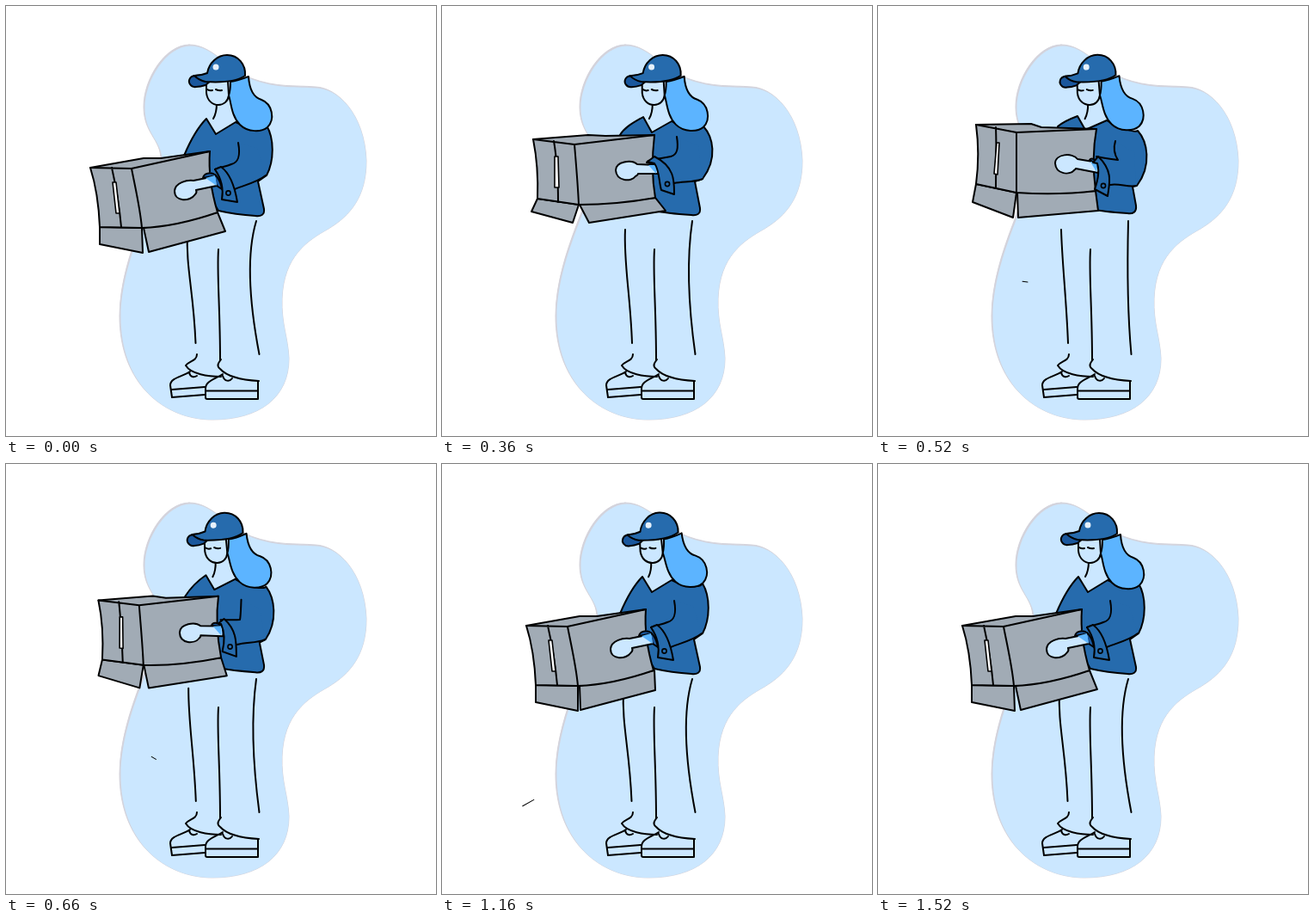
Write an HTML page with a canvas that moves like this. It is 500 by 500 pixels and loops after 1.54 s.

```html
<!DOCTYPE html>
<html lang="en">
<head>
<meta charset="utf-8">
<title>Parcel carrier</title>
<style>
  html, body { margin: 0; width: 100%; height: 100%; overflow: hidden; background: #fff; }
  canvas { display: block; width: 500px; height: 500px; }
</style>
</head>
<body>
<canvas id="stage" width="500" height="500"></canvas>
<script>
const ctx = document.getElementById('stage').getContext('2d');
const LOOP = 1540;
const TIMES = [0, 220, 360, 520, 840, 1160, LOOP];
const PALE = '#cbe7ff', NAVY = '#266bad', DEEP = '#1a579c', SKY = '#5cb4ff';
const GREY = '#a1abb5', RIM = '#d3d3dc', INK = '#000';

// Four arm poses: lowered, lifted, settling, lifted high. Lowered is held to the end.
const poses = (low, lift, settle, high) => [low, lift, settle, high, low, low, low];

const torso = poses(
  'M233 131 L244 149 L267 135 C285 144 300 144 303 139 C312 154 312 180 303 197 L293 204 L300 236 C301 243 296 245 290 244 C275 243 260 241 247 238 L207 174 C215 155 222 142 233 131Z',
  'M234 131 L244 148 L267 135 C285 144 302 145 304 140 C315 153 321 180 305 204 L294 206 L300 236 C301 243 296 245 290 244 C275 243 260 241 247 238 L219 148 C223 140 228 137 234 131Z',
  'M234 129 L244 147 L267 134 C285 144 302 145 304 140 C315 152 321 177 303 201 L294 204 L300 235 C301 242 296 244 290 243 C275 242 260 241 247 238 L207 150 C212 141 222 136 234 129Z',
  'M232 128 L241 144 L266 133 C283 144 300 147 302 145 C313 157 319 185 301 209 L296 210 L300 232 C301 240 296 242 290 241 C275 240 260 239 247 236 L209 140 C215 135 224 131 232 128Z');

const boxBody = poses(
  'M98 188 L160 177 L180 177 L237 169 C235 195 240 220 246 240 C220 249 190 257 158 258 L109 257 C108 232 105 210 98 188Z',
  'M107 152 L172 147 L190 149 L248 149 C245 175 245 200 249 221 C220 226 190 229 159 229 L113 220 C114 195 112 172 107 152Z',
  'M106 155 L170 150 L190 151 L247 150 C244 176 244 200 248 223 C220 228 190 231 159 231 L111 224 C112 198 110 175 106 155Z',
  'M114 138 L178 137 L190 141 L254 143 C250 165 250 192 253 215 C220 219 190 219 161 217 L114 207 C117 184 117 160 114 138Z');

const boxSeams = poses(
  'M98 188 L146 189 L237 169 M146 189 C150 210 156 235 158 258 M123 188 C128 210 132 235 134 257',
  'M107 152 L155 158 L248 149 M155 158 C158 180 159 206 159 229 M130 154 C134 178 135 200 135 224',
  'M106 155 L154 161 L247 150 M154 161 C156 185 158 208 159 231 M130 157 C134 180 135 205 135 228',
  'M114 138 L161 147 L254 143 M161 147 C161 170 161 195 161 217 M137 141 C138 165 137 190 137 212');

const slot = poses(
  'M124 205 L128 205 L132 241 L128 241Z',
  'M132 171 L136 171 L136 208 L132 208Z',
  'M131 175 L135 175 L136 211 L131 211Z',
  'M138 159 L141 159 L139 196 L135 195Z');

const sleeve = poses(
  'M270 159 C273 175 270 182 262 184 C252 188 243 189 236 194 L246 205 L266 213 C278 208 292 205 302 197 L292 165Z',
  'M273 155 C273 162 273 168 273 175 C262 176 252 176 244 178 L252 190 L270 206 C282 206 296 207 305 204 L298 165Z',
  'M273 152 C275 165 274 173 266 175 C258 177 250 177 242 180 L252 190 L270 206 C282 204 294 205 303 201 L298 162Z',
  'M276 157 C273 167 275 173 279 179 C270 178 262 177 254 175 L258 192 L270 208 C280 206 291 211 300 209 L298 170Z');

const creases = poses(
  'M270 159 C273 175 270 182 262 184 C256 187 250 187 243 190 M266 213 C278 208 292 205 302 197',
  'M273 155 C273 162 273 168 273 175 C262 176 252 176 244 178 M270 206 C282 206 296 207 305 204',
  'M273 152 C275 165 274 173 266 175 C258 177 250 177 242 180 M270 206 C282 204 294 205 303 201',
  'M276 157 C273 167 275 173 279 179 C270 178 262 177 254 175 M270 208 C280 206 291 211 300 209');

const cuff = poses(
  'M243 190 L250 187 C261 195 266 210 269 228 L251 225 C253 213 250 200 243 190Z',
  'M240 180 L248 176 L265 180 C271 188 269 206 269 221 L254 215 C252 205 254 191 248 183Z',
  'M239 181 L247 175 L264 179 C271 187 270 204 270 219 L255 214 C252 204 253 191 247 183Z',
  'M250 182 L256 175 L269 182 C274 192 269 207 267 221 L252 213 C255 204 258 194 255 183Z'
).map(path => path.replace('L265 180 ', '').replace('L264 179 ', '').replace('L269 182 ', ''));

const cuffOpening = poses(
  'M229 200 C230 194 238 193 243 196 C247 200 250 205 251 213 L245 209 L240 198Z',
  'M238 182 C240 178 246 179 249 183 C252 186 253 190 252 196 L250 194 L246 184Z',
  'M238 182 C240 178 246 179 249 183 C252 186 253 190 252 196 L250 194 L246 184Z',
  'M246 179 C248 176 252 178 254 182 C256 185 257 188 256 193 L255 192 L252 183Z');

const hand = poses(
  'M243 198 L218 203 C211 202 197 205 196 215 C196 228 214 228 220 219 C222 217 222 216 221 214 L245 209',
  'M249 185 L227 183 C220 178 202 181 202 191 C203 204 220 205 225 198 C227 197 228 196 228 194 L251 195',
  'M249 185 L227 184 C220 178 202 181 202 191 C203 204 220 205 225 198 C227 197 228 196 228 195 L251 195',
  'M256 182 L232 178 C226 170 206 172 206 183 C207 196 223 197 228 191 C229 190 230 190 230 189 L256 194');

const wristShade = poses(
  'M232 200 L243 197 L245 209Z', 'M240 185 L251 185 L249 195Z',
  'M240 185 L251 185 L249 195Z', 'M247 181 L256 182 L254 193Z');

const button = poses('M258.5 217.5', 'M261 208', 'M262 207', 'M262 209');

const thigh = poses(
  'M211 262 C209 305 218 330 220.5 392', 'M213 260 C208 295 219 335 221 392',
  'M213 260 C211 298 219 335 221 392', 'M213 260 C214 298 219 340 221 392');

const backLeg = poses(
  'M291 250 C279 290 283 345 294.5 405', 'M291 250 C280 290 284 345 294.5 405',
  'M291 250 C285 290 286 345 294.5 405', 'M291 250 C290 290 289 345 294.5 405');

const leftFlap = [
  'M109 257 L109 277 L159 287 L158 258Z',
  'M113 220 L109 241 L157 257 L159 229Z',
  'M111 224 L104 239 L152 252 L159 231Z',
  'M114 207 L110 228 L157 246 L161 217Z',
  'M109 257 L104 272 L153 281 L158 258Z',
  'M109 257 L109 277 L158 287 L158 258Z',
  'M109 257 L109 277 L159 287 L158 258Z'];

const rightFlap = [
  'M160 258 L166 286 L255 262 L246 240Z',
  'M161 229 L165 257 L257 242 L249 221Z',
  'M160 231 L171 252 L260 238 L248 223Z',
  'M162 217 L163 246 L256 238 L253 215Z',
  'M158 258 L170 281 L258 258 L246 240Z',
  'M160 258 L161 286 L248 263 L247 240Z',
  'M160 258 L166 286 L255 262 L246 240Z'];

const headTilt = [0, 0, -0.3, -1.3, -3.1, -2.8, 0].map(String);

function segment(t) {
  let i = 0;
  while (i < TIMES.length - 2 && t >= TIMES[i + 1]) i++;
  const u = (t - TIMES[i]) / (TIMES[i + 1] - TIMES[i]);
  return [i, u * u * (3 - 2 * u)];
}

const NUMBER = /-?\d+(\.\d+)?/g;

// Blends the numbers of two neighbouring keys that share one structure.
function blend(keys, t) {
  const [i, u] = segment(t);
  const next = keys[i + 1].match(NUMBER);
  let n = 0;
  return keys[i].replace(NUMBER, v => (+v + (next[n++] - v) * u).toFixed(3));
}

function paint(path, fill, stroke = INK, width = 2) {
  const shape = new Path2D(path);
  if (fill) { ctx.fillStyle = fill; ctx.fill(shape); }
  if (stroke) { ctx.strokeStyle = stroke; ctx.lineWidth = width; ctx.stroke(shape); }
}

function disc(x, y, r, fill, stroke) {
  ctx.beginPath();
  ctx.arc(x, y, r, 0, Math.PI * 2);
  if (fill) { ctx.fillStyle = fill; ctx.fill(); }
  if (stroke) { ctx.strokeStyle = stroke; ctx.lineWidth = 1.6; ctx.stroke(); }
}

const blob = 'M213 45 C185 45 160 85 160 117 C160 148 180 155 180 178 C180 215 133 285 132 360 ' +
  'C132 440 185 481 240 481 C295 481 329 455 329 410 C328 385 320 370 321 340 ' +
  'C323 291 350 273 375 259 C400 244 419 222 419 180 C417 125 385 95 360 94 ' +
  'C335 92 315 95 285 84 C255 72 240 45 213 45Z';

function drawBackdrop() {
  ctx.save();
  paint(blob, RIM, RIM, 1);
  ctx.clip(new Path2D(blob));
  ctx.translate(1.5, 1.5);
  paint(blob, PALE, null);
  ctx.restore();
}

function drawLegs(t) {
  paint(blend(thigh, t));
  paint(blend(backLeg, t));
  paint('M247 283 C245 310 249 350 249 412');
  paint('M222 405 C222 413 212 413 209 418 C215 428 235 431 250 431');
  paint('M214 425 C206 431 191 432 191 441 L193 455 L231 452 M193 446 L231 443 M213 426 C214 432 219 432 222 430');
  paint('M250 411 C246 416 245 419 249 422 C258 432 275 435 294 436');
  paint('M252 428 C243 434 232 436 232 445 L232 455 Q232 457 234 457 L293 457 L293 436 M232 447.5 L293 447.5 M252 430 C254 437 260 437 263 433');
}

function drawHead(t) {
  ctx.save();
  ctx.translate(247, 150);
  ctx.rotate(blend(headTilt, t) * Math.PI / 180);
  ctx.translate(-247, -150);
  paint('M245 113 C245 121 244 126 241 131');
  paint('M233 89 L233 101 C234 110 240 115 247 115 C253 115 258 111 259 104 L258 87', PALE);
  paint('M234 97 Q237 99 240 98 M244 97 Q248 99 251 98');
  paint('M261 88 C270 87 277 84 282 82 C283 97 287 106 297 109 C310 114 313 132 304 141 ' +
    'C297 147 281 147 272 138 C262 128 262 113 259 104 C261 98 261 93 261 88Z', SKY);
  paint('M232 80 C224 82 217 79 214 84 C211 89 215 95 221 94 C225 94 229 93 232 92 L238 87Z', DEEP);
  paint('M234 78 C229 80 224 81 219 81 C223 85 227 87 232 88 ' +
    'C248 89 268 88 278 81 C279 68 270 57 257 57 C246 57 236 66 234 78Z', NAVY);
  disc(244, 71, 3.5, '#e6f1fb');
  ctx.restore();
}

function drawBox(t) {
  paint(blend(leftFlap, t), GREY);
  paint(blend(rightFlap, t), GREY);
  paint(blend(boxBody, t), GREY);
  paint(blend(boxSeams, t));
  paint(blend(slot, t), '#fff', INK, 1.6);
}

function drawArm(t) {
  paint(blend(sleeve, t), NAVY, null);
  paint(blend(creases, t));
  paint(blend(cuffOpening, t), DEEP);
  paint(blend(hand, t), PALE);
  paint(blend(wristShade, t), SKY, null);
  paint(blend(cuff, t), NAVY);
  const [x, y] = blend(button, t).match(NUMBER).map(Number);
  disc(x, y, 2.6, null, INK);
}

// A thin scrap that drifts between two points while turning.
function drawScrap(t, start, end, from, to, length, turn) {
  if (t < start || t > end) return;
  const u = (t - start) / (end - start);
  ctx.save();
  ctx.translate(from[0] + (to[0] - from[0]) * u, from[1] + (to[1] - from[1]) * u);
  ctx.rotate(turn[0] + (turn[1] - turn[0]) * u);
  paint(`M${-length / 2} 0 L${length / 2} 0`, null, INK, 1);
  ctx.restore();
}

function draw(now) {
  const t = now % LOOP;
  ctx.fillStyle = '#fff';
  ctx.fillRect(0, 0, 500, 500);
  ctx.lineJoin = ctx.lineCap = 'round';
  drawBackdrop();
  drawLegs(t);
  paint(blend(torso, t), NAVY);
  drawHead(t);
  drawBox(t);
  drawArm(t);
  drawScrap(t, 520, 860, [171, 320.5], [173, 372], 6, [0.15, 1.1]);
  drawScrap(t, 840, 1180, [88.5, 294.5], [101, 400], 15, [0.15, -0.55]);
  requestAnimationFrame(draw);
}
requestAnimationFrame(draw);
</script>
</body>
</html>
```
